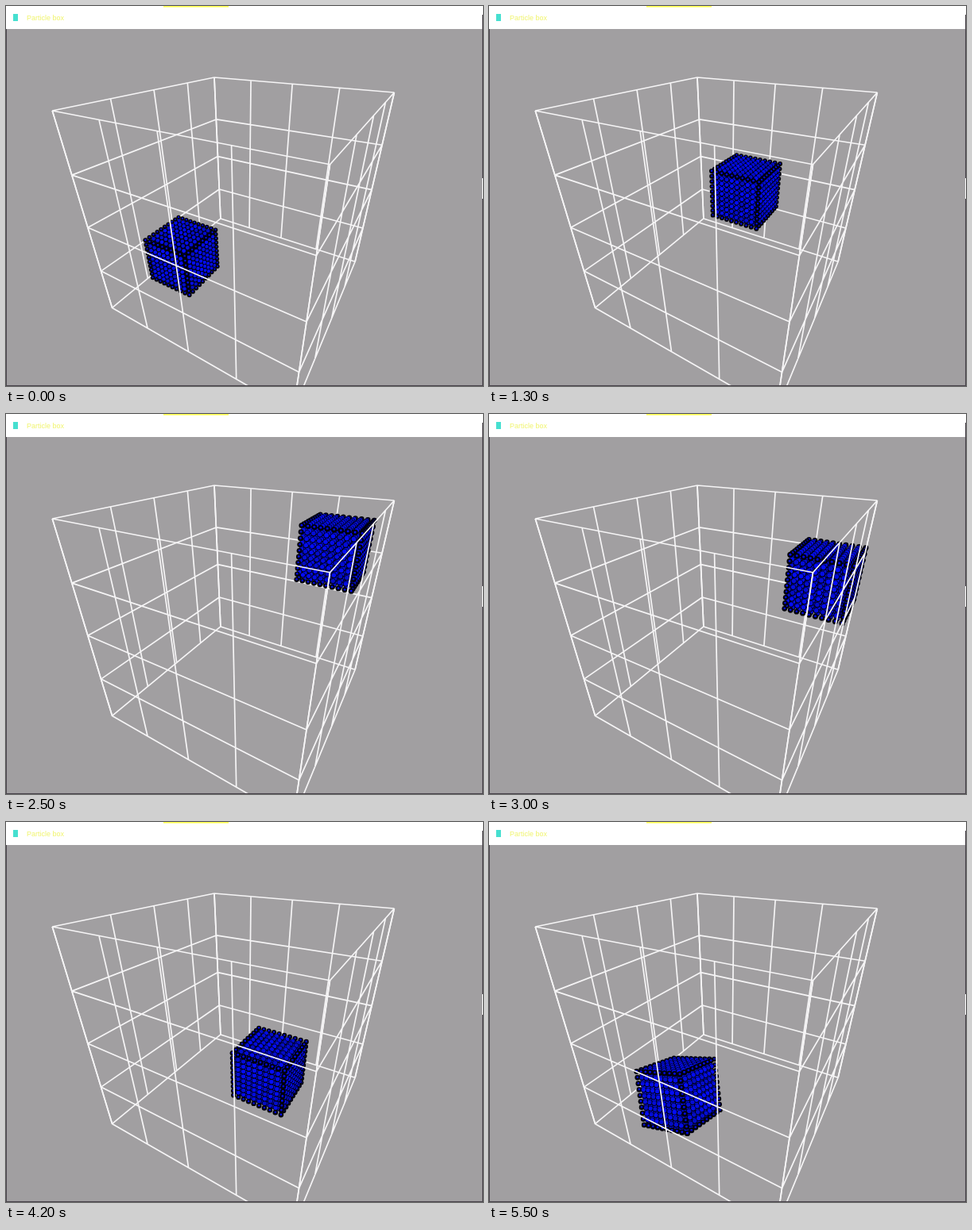
An HTML page with a canvas that plays this animation: 600 px wide and 479 px high, repeating every 5.6 s.

```html
<!DOCTYPE html>
<html lang="en">
<head>
<meta charset="utf-8">
<title>Bouncing lattice</title>
<style>
  html, body { margin: 0; width: 100%; height: 100%; overflow: hidden; background: #a19fa1; }
  canvas { display: block; width: 600px; height: 479px; }
</style>
</head>
<body>
<canvas id="stage" width="600" height="479"></canvas>
<script>
const ctx = document.getElementById('stage').getContext('2d');
const LOOP = 5.6, STEP = 0.1;
const N = 10, SIDE = 0.25, GAP = SIDE / (N - 1);
const TUMBLE_START = 4.78, TUMBLE_RATE = 0.6;

// The centre drifts in straight lines between bounces off the room's sides
const BOUNCES = [
  { t: 0,    at: [0.667, 0.222, 0.79] },
  { t: 0.29, at: [0.594, 0.287, 0.85] },
  { t: 2.12, at: [0.16,  0.716, 0.155] },
  { t: 2.85, at: [0.303, 0.92,  0.24] },
  { t: 4.78, at: [0.675, 0.565, 0.86] },
  { t: 5.6,  at: [0.825, 0.403, 0.72] }
];

function centreAt(t) {
  const n = BOUNCES.findIndex(b => b.t > t);
  const from = BOUNCES[n - 1], to = BOUNCES[n];
  const f = (t - from.t) / (to.t - from.t);
  return from.at.map((p, axis) => p + (to.at[axis] - p) * f);
}

// Perspective view of the unit room: u runs left, v right, s down
function project(u, v, s) {
  const w = 1 - 0.406 * u - 0.234 * v + 0.27 * s;
  return [(262 - 227.4 * u + 112.1 * v + 80.8 * s) / w,
          (90 - 11.6 * u - 6.5 * v + 250.3 * s) / w,
          w];
}

function line(a, b) {
  const [ax, ay] = project(...a), [bx, by] = project(...b);
  ctx.moveTo(ax, ay);
  ctx.lineTo(bx, by);
}

function wall(at) {
  ctx.beginPath();
  for (let q = 0; q <= 1; q += 0.25) {
    line(at(q, 0), at(q, 1));
    line(at(0, q), at(1, q));
  }
  ctx.strokeStyle = '#f6f5f6';
  ctx.lineWidth = 1.7;
  ctx.stroke();
}

function rect(color, x, y, w, h) {
  ctx.fillStyle = color;
  ctx.fillRect(x, y, w, h);
}

function disc(color, x, y, r) {
  ctx.fillStyle = color;
  ctx.beginPath();
  ctx.arc(x, y, r, 0, 2 * Math.PI);
  ctx.fill();
}

function hash(n) {
  const v = Math.sin(n * 12.9898) * 43758.5453;
  return v - Math.floor(v);
}

// Leans the foot of the lattice towards the viewer
function tilt([u, v, s], angle) {
  const along = (u + v) / 2, across = (u - v) / 2;
  const cos = Math.cos(angle), sin = Math.sin(angle);
  const lean = along * cos + s * sin * Math.SQRT1_2;
  return [lean + across, lean - across, s * cos - along * sin * Math.SQRT2];
}

function lattice(t) {
  const centre = centreAt(t);
  const angle = Math.max(0, t - TUMBLE_START) * TUMBLE_RATE;
  const balls = [];
  for (let n = 0; n < N ** 3; n++) {
    const cell = [n % N, Math.floor(n / N) % N, Math.floor(n / N ** 2)];
    const offset = tilt(cell.map(c => c * GAP - SIDE / 2), angle);
    const [x, y, w] = project(...offset.map((p, axis) => p + centre[axis]));
    const onEdge = cell.filter(c => c % (N - 1) === 0).length > 1;
    balls.push({ x, y, w, onEdge, light: hash(n + 1) });
  }
  balls.sort((a, b) => b.w - a.w);
  for (const { x, y, w, onEdge, light } of balls) {
    const r = 210 * GAP * 0.43 / w;
    disc('#01010c', x, y, r);
    disc(`rgb(4, 12, ${190 + 65 * light})`, x, y - r * 0.1, r * (onEdge ? 0.4 : 0.78));
  }
}

function titleBar() {
  rect('#fff', 0, 0, 600, 29);
  rect('#ffff4a', 198, 0, 82, 1.5);
  rect('#46dfd0', 9, 10, 6, 9);
  ctx.font = '9px "Liberation Sans", Arial, sans-serif';
  ctx.fillStyle = '#f0f46a';
  ctx.fillText('Particle box', 26, 18);
}

function border() {
  const dark = '#4a444c';
  rect(dark, 0, 29, 1, 450);
  rect(dark, 599, 11, 1, 468);
  rect(dark, 0, 478, 600, 1);
  rect('#fff', 599, 217, 1, 26);
}

function frame() {
  const t = Math.floor(performance.now() / 1000 % LOOP / STEP) * STEP;
  rect('#a19fa1', 0, 0, 600, 479);
  wall((p, s) => [p, 0, s]);
  wall((p, s) => [0, p, s]);
  lattice(t);
  wall((p, s) => [p, 1, s]);
  wall((p, s) => [1, p, s]);
  titleBar();
  border();
  requestAnimationFrame(frame);
}
frame();
</script>
</body>
</html>
```
